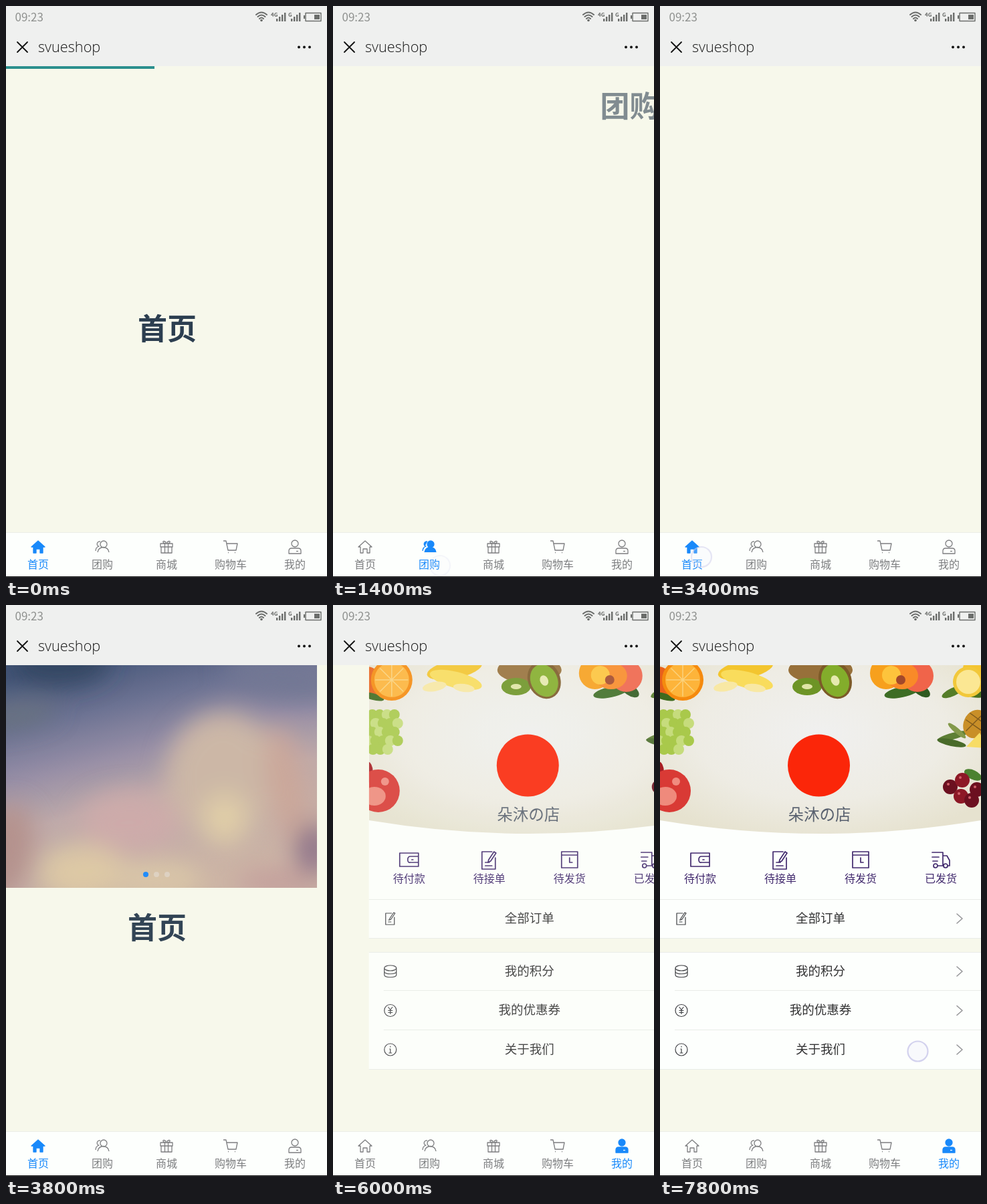
Animation, 480 px wide and 854 px high, one loop 8 s. Source, as an HTML page:

```html
<!DOCTYPE html>
<html lang="zh">
<head>
<meta charset="utf-8">
<style>
html, body { margin: 0; width: 100%; height: 100%; overflow: hidden; background: #f7f8eb; }
svg { display: block; width: 480px; height: 854px; font-family: "Noto Sans CJK SC", "Noto Sans CJK", sans-serif; }
.line { fill: none; stroke-linecap: round; stroke-linejoin: round; }
.tab { color: #7d7e80; fill: none; stroke: currentColor; stroke-width: 1.3; stroke-linejoin: round; }
.tab text { fill: currentColor; stroke: none; }
.tab.on { color: #1989fa; }
.tab.on .shape { fill: currentColor; }
.tab.on .detail { stroke: #fdfffd; }
</style>
</head>
<body>
<svg id="stage" viewBox="0 0 480 854">
  <defs>
    <clipPath id="view"><rect y="90" width="480" height="698"/></clipPath>
    <clipPath id="photo"><rect y="90" width="480" height="333"/></clipPath>
    <clipPath id="banner"><path d="M0 90H480V322Q240 362 0 322Z"/></clipPath>
    <linearGradient id="sky" x1=".2" y1="0" x2=".55" y2="1">
      <stop stop-color="#3e5074"/><stop offset=".22" stop-color="#696f90"/>
      <stop offset=".42" stop-color="#958ca4"/><stop offset=".62" stop-color="#bda8a8"/>
      <stop offset="1" stop-color="#cbb2a3"/>
    </linearGradient>
    <radialGradient id="wall" cy=".4" r=".65">
      <stop stop-color="#f0f0ef"/><stop offset=".6" stop-color="#eeece4"/><stop offset="1" stop-color="#e6e2cf"/>
    </radialGradient>
    <filter id="soft" x="-60%" y="-60%" width="220%" height="220%"><feGaussianBlur stdDeviation="18"/></filter>
  </defs>
  <g clip-path="url(#view)" id="pages"></g>
  <g id="chrome"></g>
  <rect id="progress" y="90" height="4" fill="#2b8f8e"/>
  <circle id="ring" r="15" fill="#eeeefa" fill-opacity=".35" stroke="#d3d2ee" stroke-width="2.2"/>
</svg>
<script>
const LOOP = 8000, STEP = 200, WIDTH = 480, LEAVE = 200, ENTER = 500;
const $ = id => document.getElementById(id);
const clamp = v => Math.max(0, Math.min(1, v));
const easeOut = v => 1 - (1 - clamp(v)) ** 3;

// Text centred on (x, y)
const text = (x, y, size, str, fill = '#323233', extra = 'text-anchor="middle"') =>
  `<text x="${x}" y="${y + size * .37}" font-size="${size}" fill="${fill}" ${extra}>${str}</text>`;
const circle = (x, y, r, fill, extra = '') => `<circle cx="${x}" cy="${y}" r="${r}" fill="${fill}" ${extra}/>`;
const oval = (x, y, rx, ry, fill, turn = 0) =>
  `<ellipse rx="${rx}" ry="${ry}" fill="${fill}" transform="translate(${x} ${y}) rotate(${turn})"/>`;
const rect = (x, y, w, h, fill) => `<rect x="${x}" y="${y}" width="${w}" height="${h}" fill="${fill}"/>`;
const line = (d, color, width = 1.5, x = 0, y = 0) =>
  `<path class="line" d="${d}" stroke="${color}" stroke-width="${width}" transform="translate(${x} ${y})"/>`;
const heading = (str, y = 150) => text(241, y, 44, str, '#2c3e50', 'text-anchor="middle" font-weight="700"');

function homePage() {
  const blobs = [
    [95, 85, 75, 35, '#2f435f'], [20, 165, 70, 18, '#66707c', -8], [430, 110, 90, 30, '#6e7391', 10],
    [340, 255, 85, 95, '#cbb5a4'], [200, 325, 75, 45, '#cca9a8'], [435, 270, 30, 90, '#c9a597', -10],
    [10, 370, 45, 75, '#b28f8a', 15], [130, 400, 65, 40, '#dcc8a3'], [240, 410, 70, 25, '#d9c6a6'],
    [342, 320, 32, 38, '#dfcda5'], [475, 365, 28, 40, '#8b7187'], [420, 415, 60, 20, '#c29d99']
  ];
  return `<g id="photoArea" clip-path="url(#photo)">${rect(0, 90, 480, 333, 'url(#sky)')}
    <g filter="url(#soft)">${blobs.map(b => oval(...b)).join('')}</g>
    ${[224, 240, 256].map((x, i) => circle(x, 403, 4, i ? '#ebedf0' : '#1989fa', i ? 'opacity=".35"' : '')).join('')}
    </g>` + heading('首页', 483);
}

function fruit() {
  const grapes = Array.from({ length: 26 }, (_, i) => {
    const row = i / 5 | 0;
    return circle(-6 + i % 5 * 11 + row % 2 * 5 - (row > 3 ? 10 : 0), 164 + row * 13, 8, i % 3 ? '#a9c94b' : '#c6dc7c');
  }).join('');
  const cherries = [[434, 272], [452, 262], [474, 276], [450, 286], [466, 292]]
    .map(([x, y], i) => circle(x, y, 11, i % 2 ? '#8d1826' : '#6c1020') + circle(x - 3, y - 4, 2, '#d0606a')).join('');
  return [
    // orange
    circle(-4, 116, 24, '#e8611c'), oval(6, 137, 17, 5, '#3f6a1e', 15), circle(34, 112, 31, '#f58a0e'),
    circle(34, 112, 26, '#fdb43a'), line('M34 88V136M10 112H58M17 95L51 129M51 95L17 129', '#fbd27c', 1.5),
    // banana
    oval(128, 96, 42, 14, '#f3c52e', -12), oval(130, 112, 40, 12, '#f9dc5c', 14),
    oval(98, 122, 18, 7, '#f8e8a4', -10), oval(142, 124, 16, 6, '#f8e8a4', 8),
    // kiwi
    oval(240, 97, 48, 20, '#97703a'), oval(220, 122, 22, 13, '#6d9426'), oval(262, 112, 29, 24, '#7c5a28', 65),
    oval(262, 113, 25, 20, '#83ad2b', 65), oval(262, 113, 8, 6, '#e6e9ae', 65), oval(220, 122, 8, 4, '#dfe5a5'),
    // peach
    oval(362, 130, 27, 8, '#3d6d25', -12), oval(390, 127, 16, 8, '#2f5a20', 35), circle(338, 102, 24, '#f7a01d'),
    circle(385, 106, 24, '#f0644a'), oval(362, 106, 24, 20, '#f98a28'), oval(346, 105, 14, 14, '#fdc43c'), circle(360, 112, 7, '#a3482a'),
    // lemon
    oval(438, 130, 18, 6, '#557d28', -25), oval(468, 132, 18, 6, '#48701f', 10), circle(474, 96, 21, '#f4c531'),
    circle(461, 115, 23, '#f2c83a'), circle(461, 115, 18, '#fbe793'),
    grapes,
    // pomegranate
    oval(-2, 250, 8, 16, '#a81e24'), circle(14, 278, 32, '#d93a35'), oval(8, 286, 17, 14, '#ef8a7c'), circle(24, 264, 6, '#f08b80'),
    // pineapple
    oval(438, 196, 24, 5, '#5e7f35', -15), oval(436, 206, 22, 5, '#496b2a', 12), oval(444, 188, 17, 4, '#83994a', 40),
    oval(472, 178, 18, 22, '#c98f28', 25), line('M458 172L484 190M464 162L486 178M458 188L482 164', '#815b1c', 1.5),
    '<path d="M458 212L478 191L490 214Z" fill="#f7dc66"/>',
    oval(468, 254, 14, 7, '#4b8130', 25), cherries
  ].join('');
}

function minePage() {
  const purple = '#41296d', ink = '#3d3e42';
  const orders = [
    ['待付款', 'M-14-10H14V10H-14ZM14-5H2Q-2-5-2 0T2 4H14M4 0H6'],
    ['待接单', 'M4-12H-11V14H9V-3M-6 9H4M-6 4H0M7-12L10-10L2 2L-2 4L-1 0Z'],
    ['待发货', 'M-12-12H12V12H-12ZM-12-7H12M0-3V4H4'],
    ['已发货', 'M-13-11H3V9M3-6H9L13 1V9H10M-13-4H-3M-12 2H-5M-5 9H4M-11 9a3 3 0 1 0 6 0a3 3 0 1 0-6 0M4 9a3 3 0 1 0 6 0a3 3 0 1 0-6 0']
  ].map(([label, d], i) => {
    const x = 60 + i * 120;
    return line(d, purple, 1.7, x, 381) + text(x, 409, 16, label, purple);
  }).join('');
  const ringPath = 'M-9 0a9 9 0 1 0 18 0a9 9 0 1 0-18 0';
  const rows = [
    ['全部订单', 469, 'M2-8H-7V9H6V-2M-3 5H1M-3 2H-1M5-9L7-8L1 1L-1 2L-1 0Z'],
    ['我的积分', 548, 'M-9-5a9 4 0 1 0 18 0a9 4 0 1 0-18 0V5C-9 10 9 10 9 5V-5M-9 0C-9 5 9 5 9 0'],
    ['我的优惠券', 606.5, ringPath + 'M-3-5L0-1L3-5M0-1V5M-3 0H3M-3 3H3'],
    ['关于我们', 665, ringPath + 'M0-5V-4M-1-1H0V5M-2 5H2']
  ].map(([label, y, d]) => line(d, ink, 1.2, 32, y) + text(240, y - 1, 18.5, label) +
    line('M-4-7L4 0L-4 7', '#969799', 1.6, 448, y)).join('');
  const rules = [[0, 440], [0, 498], [0, 519], [22, 576], [22, 635], [0, 694]]
    .map(([x, y]) => rect(x, y, 480 - x, 1, '#e9ece8')).join('');
  return rect(0, 90, 480, 408, '#fdfffd') + rect(0, 519, 480, 175, '#fdfffd') +
    `<g clip-path="url(#banner)">${rect(0, 90, 480, 255, 'url(#wall)')}${fruit()}</g>` +
    circle(237.5, 240, 46.5, '#fb2609') + text(238.5, 313.5, 23.5, '朵沐の店', '#59616f') + orders + rules + rows;
}

const tabs = [
  ['首页', 'M-10 0L0-9L10 0H7V9H3V3H-3V9H-7V0Z', ''],
  ['团购', 'M-3-4a5 5 0 1 1 10 0a5 5 0 1 1-10 0M-7 8C-6-2 9-2 10 8M-3-8C-9-9-9-1-5-1C-8 0-10 2-10 6', ''],
  ['商城', 'M-9-5H9V0H-9ZM-8 0H8V9H-8ZM-1-5C-8-6-5-11-1-7ZM1-5C8-6 5-11 1-7Z', 'M-2.5-5V9M2.5-5V9'],
  ['购物车', 'M-11-9H-7L-4 5H8L10-5H-6M-4 8.5h1M6 8.5h1', ''],
  ['我的', 'M-5-5a5 5 0 1 0 10 0a5 5 0 1 0-10 0M-9 10V6Q-9 2-5 2H5Q9 2 9 6V10Z', 'M2 6.5H5']
];

function chrome() {
  const gray = '#6b6d6b';
  const bars = x => [4, 7, 10, 13].map((h, i) => rect(x + i * 4, 23 - h, 2.4, h, gray)).join('');
  const tag = (x, str) => text(x, 13, 8, str, gray, 'font-weight="700"');
  return rect(0, 0, 480, 90, '#eff0ef') +
    text(13.5, 17, 17, '09:23', '#8e908e', 'font-weight="300"') +
    line('M-8-4Q0-11 8-4M-5.5-1Q0-6 5.5-1M-3 2Q0-1 3 2', gray, 2, 382, 17) + circle(382, 21.5, 1.8, gray) +
    tag(396, '4G') + bars(404) + tag(422, 'G') + bars(426) +
    line('M448 10.5H471V22.5H448Z', gray, 1.4) + rect(445, 14, 2, 5, gray) + rect(461, 13, 8, 7, gray) +
    line('M17 54L32 69M32 54L17 69', '#111', 1.8) +
    text(48, 61, 21.7, 'svueshop', '#161616', 'font-family="Open Sans, sans-serif" font-weight="300"') +
    [438, 446, 454].map(x => circle(x, 61.5, 2, '#111')).join('') +
    rect(0, 788, 480, 65, '#fdfffd') + rect(0, 787, 480, 1, '#eceee8') + rect(0, 853, 480, 1, '#111') +
    tabs.map(([label, shape, detail], i) => `<g class="tab" transform="translate(${48 + i * 96} 809)">
      <path class="shape" d="${shape}"/><path class="detail" d="${detail}"/>${text(0, 26, 16, label, '')}</g>`).join('');
}

const views = [homePage(), heading('团购'), heading('商城'), heading('购物车'), minePage()];
$('pages').innerHTML = views.map(v => `<g>${v}</g>`).join('');
$('chrome').innerHTML = chrome();
const pageNodes = [...$('pages').children];
const tabNodes = [...document.querySelectorAll('.tab')];

// [page, start of its entrance]
const visits = [[0, -1000], [1, 1275], [3, 2260], [0, 3457.5], [2, 4630], [4, 5741]];
// [x, y, time]
const touches = [[160, 837, 1040], [335, 832, 2000], [62, 824, 3200], [230, 837, 4400], [430, 832, 5400], [385.5, 667.5, 7800]];

function draw(t) {
  const i = visits.findLastIndex(([, start]) => t >= start - LEAVE);
  const [page, start] = visits[i];
  const from = i ? visits[i - 1][0] : page;
  const side = page > from ? 1 : -1;
  const leaving = t < start;
  const p = leaving ? easeOut((t - start + LEAVE) / LEAVE) : easeOut((t - start) / ENTER);
  const shown = leaving ? from : page;
  const x = WIDTH * side * (leaving ? -p : 1 - p);

  pageNodes.forEach((node, n) => {
    node.style.display = n === shown ? '' : 'none';
    node.setAttribute('transform', `translate(${x} 0)`);
    node.setAttribute('opacity', leaving ? 1 - p : p);
  });
  tabNodes.forEach((node, n) => node.classList.toggle('on', n === page));

  $('photoArea').style.display = t < 200 ? 'none' : '';
  $('progress').setAttribute('width', Math.min(WIDTH, 222 + t * .65));
  $('progress').setAttribute('opacity', clamp(2 - t / 400));

  const touch = touches.findLast(([, , at]) => t >= at);
  $('ring').setAttribute('opacity', touch ? clamp(1 - (t - touch[2]) / 450) : 0);
  if (touch) $('ring').setAttribute('transform', `translate(${touch[0]} ${touch[1]})`);
}

function tick() {
  draw(Math.floor(performance.now() % LOOP / STEP) * STEP);
  requestAnimationFrame(tick);
}
tick();
</script>
</body>
</html>
```
